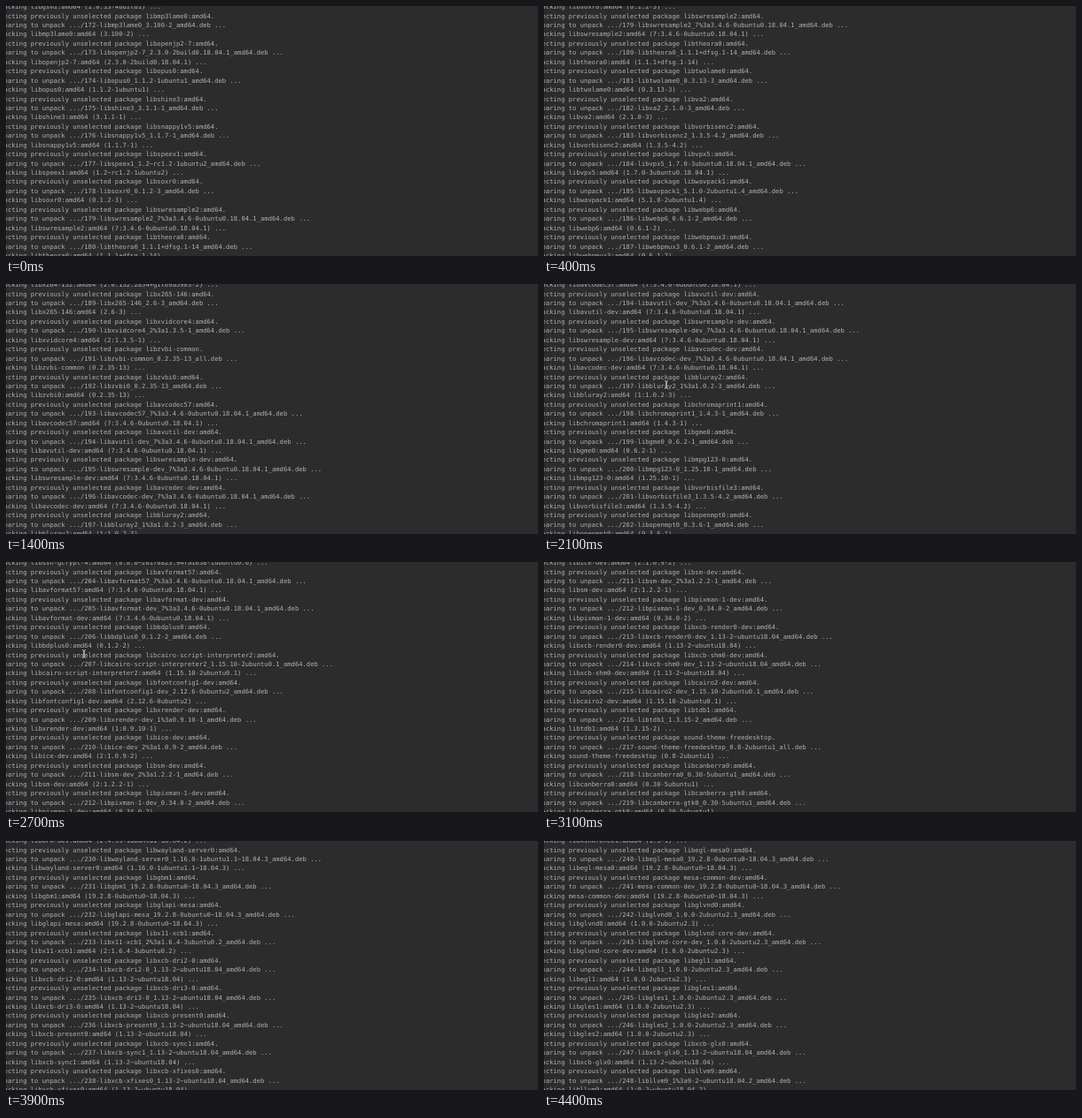
These frames come from a looping animation (600x283 px, 4900 ms). An HTML page with a canvas:

```html
<!DOCTYPE html>
<html lang="en">
<head>
<meta charset="utf-8">
<title>Package installation log</title>
<style>
html, body { margin: 0; width: 100%; height: 100%; overflow: hidden; background: #2c2c2c; }
canvas { display: block; }
</style>
</head>
<body>
<canvas id="stage" width="600" height="283"></canvas>
<script>
const LOOP = 4900, TICK = 100;
const FIRST = 171, PITCH = 10.44, CHAR = 4.32, LEFT = -15.4, BASE = 3.1;

// "name version [all]"; a missing version repeats the one before
const packages = `libgsm1 1.0.13-4build1
libmp3lame0 3.100-2
libopenjp2-7 2.3.0-2build0.18.04.1
libopus0 1.1.2-1ubuntu1
libshine3 3.1.1-1
libsnappy1v5 1.1.7-1
libspeex1 1.2~rc1.2-1ubuntu2
libsoxr0 0.1.2-3
libswresample2 7:3.4.6-0ubuntu0.18.04.1
libtheora0 1.1.1+dfsg.1-14
libtwolame0 0.3.13-3
libva2 2.1.0-3
libvorbisenc2 1.3.5-4.2
libvpx5 1.7.0-3ubuntu0.18.04.1
libwavpack1 5.1.0-2ubuntu1.4
libwebp6 0.6.1-2
libwebpmux3
libx264-152 2:0.152.2854+gite9a5903-2
libx265-146 2.6-3
libxvidcore4 2:1.3.5-1
libzvbi-common 0.2.35-13 all
libzvbi0
libavcodec57 7:3.4.6-0ubuntu0.18.04.1
libavutil-dev
libswresample-dev
libavcodec-dev
libbluray2 1:1.0.2-3
libchromaprint1 1.4.3-1
libgme0 0.6.2-1
libmpg123-0 1.25.10-1
libvorbisfile3 1.3.5-4.2
libopenmpt0 0.3.6-1
libssh-gcrypt-4 0.8.0~20170825.94fa1e38-1ubuntu0.6
libavformat57 7:3.4.6-0ubuntu0.18.04.1
libavformat-dev
libbdplus0 0.1.2-2
libcairo-script-interpreter2 1.15.10-2ubuntu0.1
libfontconfig1-dev 2.12.6-0ubuntu2
libxrender-dev 1:0.9.10-1
libice-dev 2:1.0.9-2
libsm-dev 2:1.2.2-1
libpixman-1-dev 0.34.0-2
libxcb-render0-dev 1.13-2~ubuntu18.04
libxcb-shm0-dev
libcairo2-dev 1.15.10-2ubuntu0.1
libtdb1 1.3.15-2
sound-theme-freedesktop 0.8-2ubuntu1 all
libcanberra0 0.30-5ubuntu1
libcanberra-gtk0
libcanberra-gtk-module
libcupsfilters1 1.20.2-0ubuntu3.1
libdjvulibre-text 3.5.27.1-8ubuntu0.1 all
libdjvulibre21
libdrm-amdgpu1 2.4.99-1ubuntu1~18.04.2
libpciaccess0 0.14-1
libdrm-intel1 2.4.99-1ubuntu1~18.04.2
libdrm-nouveau2
libdrm-radeon1
libdrm-dev
libwayland-server0 1.16.0-1ubuntu1.1~18.04.3
libgbm1 19.2.8-0ubuntu0~18.04.3
libglapi-mesa
libx11-xcb1 2:1.6.4-3ubuntu0.2
libxcb-dri2-0 1.13-2~ubuntu18.04
libxcb-dri3-0
libxcb-present0
libxcb-sync1
libxcb-xfixes0
libxshmfence1 1.3-1
libegl-mesa0 19.2.8-0ubuntu0~18.04.3
mesa-common-dev
libglvnd0 1.0.0-2ubuntu2.3
libglvnd-core-dev
libegl1
libgles1
libgles2
libxcb-glx0 1.13-2~ubuntu18.04
libllvm9 1:9-2~ubuntu18.04.2`.split('\n');

let version;
const log = packages.flatMap((entry, i) => {
  const [name, ver = version, arch = 'amd64'] = entry.split(' ');
  version = ver;
  const full = arch === 'all' ? name : name + ':amd64';
  const file = `${FIRST + i}-${name}_${ver.replace(':', '%3a')}_${arch}.deb`;
  return [
    `Selecting previously unselected package ${full}.`,
    `Preparing to unpack .../${file} ...`,
    `Unpacking ${full} (${ver}) ...`
  ];
});

// Bursts of output, first and last tick of each
const bursts = [[1, 5], [7, 9], [13, 14], [19, 23], [25, 29], [31, 36], [37, 42], [43, 44]];
// [steps done, number of the topmost complete package]
const knots = [[0, 172], [8, 185], [13, 194], [18, 204], [24, 217], [29, 230], [34, 240]];

const stepsAt = tick => bursts.reduce(
  (n, [a, b]) => n + Math.max(0, Math.min(tick, b) - a + 1), 0);

function topAt(n) {
  const k = Math.max(1, knots.findIndex(([step]) => step >= n));
  const [a, from] = knots[k - 1], [b, to] = knots[k];
  return Math.round(from + (to - from) * (n - a) / (b - a));
}

const ctx = document.getElementById('stage').getContext('2d');
ctx.textRendering = 'geometricPrecision';
ctx.font = '100px "DejaVu Sans Mono", monospace';
const scale = CHAR / ctx.measureText('M').width;

function drawPointer(x, y) {
  const beam = new Path2D(
    `M${x - 2} ${y - 4.5}q2 0 2 1.5v6q0 1.5 -2 1.5M${x + 2} ${y - 4.5}q-2 0 -2 1.5v6q0 1.5 2 1.5`);
  for (const [color, width] of [['#111', 2], ['#ddd', 0.9]]) {
    ctx.strokeStyle = color;
    ctx.lineWidth = width;
    ctx.stroke(beam);
  }
}

function draw(n) {
  ctx.fillStyle = '#2c2c2c';
  ctx.fillRect(0, 0, 600, 283);
  ctx.fillStyle = '#b2b2b2';
  const first = (topAt(n) - FIRST) * 3 - 1;
  log.slice(first, first + 28).forEach((line, i) => {
    ctx.save();
    ctx.translate(LEFT, BASE + i * PITCH);
    ctx.scale(scale, scale);
    ctx.fillText(line, 0, 0);
    ctx.restore();
  });
  if (n >= 11 && n <= 20) drawPointer(138 - 10 * (n - 13), 114 - 2 * (n - 13));
  // Edge of the menu bar
  if (n > 21) {
    ctx.fillStyle = '#161616';
    ctx.fillRect(0, 0, 600, 1);
  }
}

const start = performance.now();
function frame() {
  const t = (performance.now() - start) % LOOP;
  draw(stepsAt(Math.floor(t / TICK)));
  requestAnimationFrame(frame);
}
frame();
</script>
</body>
</html>
```
